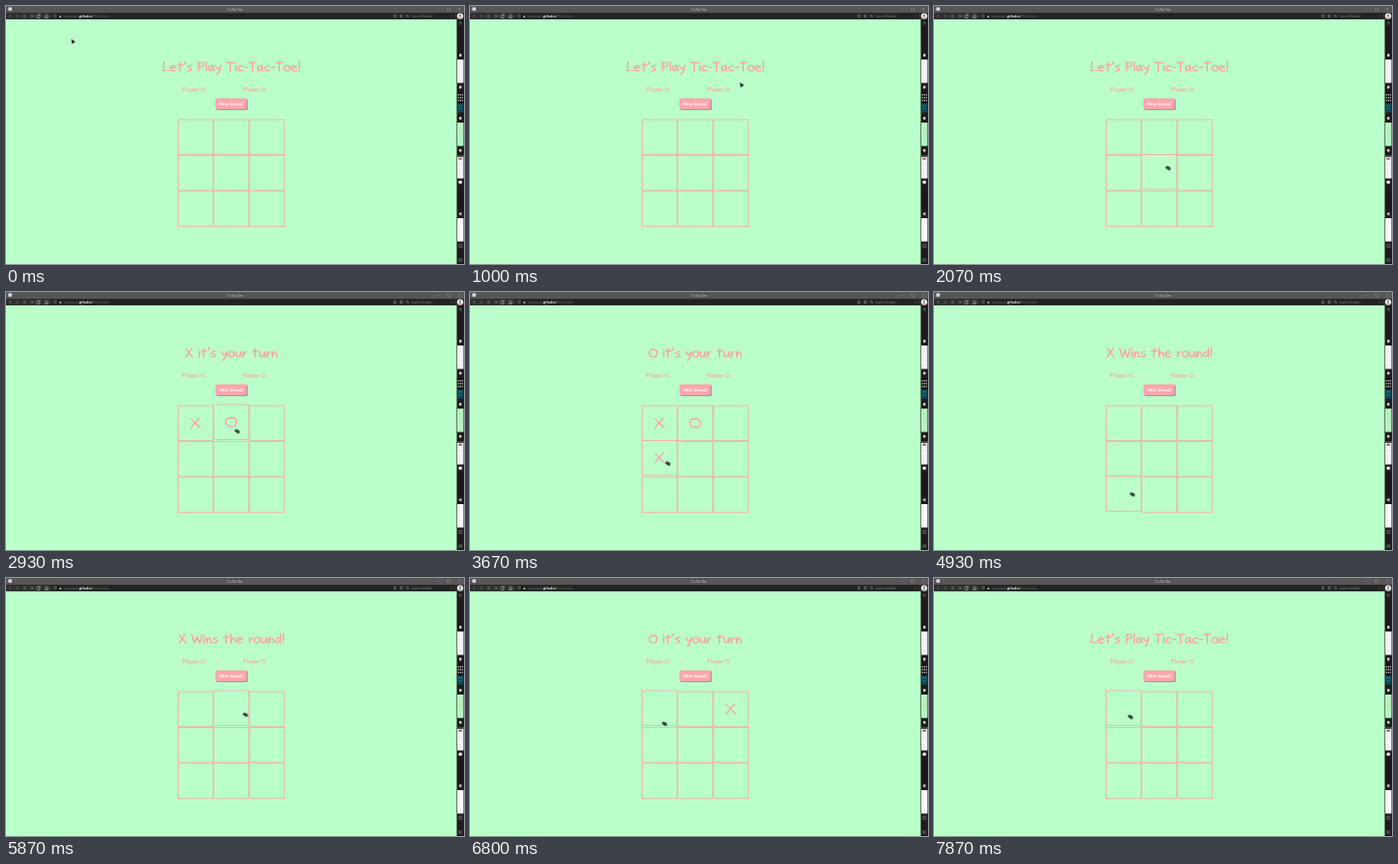
Recreate the animation shown at these times as an HTML page. Size 480 by 270 pixels, loop 8 s.

```html
<!DOCTYPE html>
<html lang="en">
<head>
<meta charset="utf-8">
<title>Tic Tac Toe</title>
<style>
html, body { margin: 0; width: 100%; height: 100%; overflow: hidden; background: #baffc9; }
svg { display: block; width: 100%; height: 100%; }
text { font-family: "Open Sans", "Noto Sans", sans-serif; }
.ink { fill: none; stroke: #fca1a3; stroke-linecap: round; stroke-linejoin: round; }
.icon { fill: none; stroke: #8e8e8e; stroke-width: .6; }
.bright { stroke: #d0d0d0; }
</style>
</head>
<body>
<svg id="stage" viewBox="0 0 480 270">
  <rect width="480" height="270" fill="#baffc9"/>
  <g id="page"></g>
  <g id="chrome"></g>
  <g id="cursor">
    <path id="arrow" d="M0 0L.7 6L2.1 4.7L4.8 3.3Z" fill="#222" stroke="#e8fff0" stroke-width=".3"/>
    <path id="hand" d="M.2 1.2L1.2.5L4 1.2L5.1 2.6L4.8 4.6L2.6 4.6L1.2 3.2L0 2.8Z" fill="#3b4a41" stroke="#4b5a50" stroke-width=".4"/>
  </g>
</svg>
<script>
const LOOP = 8000, TICK = 1000 / 15;
const $ = id => document.getElementById(id);

// Hand lettering: advance and pen strokes, baseline at 0.
const PEN = {
  " ": [5, ""],
  "L": [7.5, "M1.5-11Q1-5 1-.3Q4-.2 6.5-.7"],
  "P": [8, "M1.6-10.5Q1.2-5 1.3 0M.4-10Q7-12 7-8.3Q6.5-5.3 1.4-4.6"],
  "T": [8.5, "M.3-10.2L8-10.8M4.2-10.5Q3.8-5 4 0"],
  "X": [8.5, "M1-10.3Q4-4.5 7.8 0M7-10.5Q4-5 .5 0"],
  "O": [9.2, "M4.6-9.6Q.4-9.2.5-4.8Q.9-.2 4.6-.1Q8.4-.4 8.6-4.9Q8.4-9.5 4.2-9.6"],
  "W": [12, "M.5-10.5Q1.6-4 3.2-.2Q4.8-4 5.8-8Q7-3 8.4-.2Q10.4-5 11.2-10.8"],
  "N": [8.5, "M1 0L1.2-10.4Q4-5 7-.2L7.2-10.6"],
  "G": [9, "M7.6-9.2Q5-11.8 2.2-8.4Q-.4-3 2.4-.7Q6 1.2 7.6-4.2L4.4-4"],
  "a": [7.5, "M5.8-6Q4-7.4 2-5.8Q0-3 1.3-.8Q3.4.8 5.6-5Q5.6-1 7 0"],
  "c": [7, "M5.8-6Q3.5-7.4 1.6-5Q0-1.4 2.4-.3Q4.4.2 6.2-1.2"],
  "d": [7.5, "M5.8-5.6Q4-7 2-5.6Q0-3 1.3-.8Q3.4.8 5.8-4M6-11L6 0"],
  "e": [7.5, "M.8-3.5L6-4.2Q5.5-7 3.4-6.8Q.6-6 .7-3Q1.2 0 3.6 0Q5.5-.2 6.5-1.2"],
  "h": [7, "M1.2-11L1.1 0Q2-6 4-6.2Q5.8-6 5.8 0"],
  "i": [2.8, "M1.3-6.8L1.2 0M1.3-9.6v-.6"],
  "l": [3, "M1.5-11Q1.2-5 1.4 0"],
  "m": [10, "M1-6.8L1.1 0Q1.8-6.3 3.4-6.4Q4.8-6 4.8 0Q5.6-6.2 7.2-6.4Q8.8-6 8.8 0"],
  "n": [7, "M1-6.8L1.1 0Q1.8-6.3 4-6.5Q5.8-6.2 5.8 0"],
  "o": [7.5, "M3.5-6.8Q.5-6.3.6-3Q1 0 3.6-.1Q6.4-.6 6.5-3.6Q6.2-7 3.2-6.8"],
  "r": [5.5, "M1-6.8L1.2 0Q1.4-5.6 5-6.5"],
  "s": [6.5, "M5.2-6.6Q2-7 1.4-5.4Q1.2-4.2 3.5-3.6Q5.8-2.8 5-1.2Q3.6.4.8-.4"],
  "t": [7, "M3.2-10.5Q2.8-4 3-.1M.3-7L6.3-7.4"],
  "u": [7.5, "M.9-6.7Q.5-.3 3-.2Q5.3-.6 5.9-6.6Q5.6-2 6.8 0"],
  "w": [9, "M.6-6.6L2.5-.2L4.4-5.4L6.3-.2L8.3-6.8"],
  "y": [7, "M.6-6.5Q1.4-2.8 3.2-2.6Q5-3 6-6.6Q5.4 0 2 4"],
  "'": [3, "M1.5-11L1.2-8.3"],
  "-": [5, "M.6-4.4L4.2-4.6"],
  "!": [3, "M1.6-11.5L1.4-3.2M1.4-.5v.6"],
  ":": [3, "M1.4-5.5v-.5M1.4-1v-.5"],
  "1": [3, "M1.5-10L1.5 0"]
};
const SQUAT = .86; // the hand is broad and low

// Writes s from x, or centred on x.
function write(s, x, y, size, weight, centred, color = "#fca1a3") {
  let w = 0, out = "";
  for (const ch of s) {
    out += `<path d="${PEN[ch][1]}" transform="translate(${w})"/>`;
    w += PEN[ch][0];
  }
  const left = centred ? x - w * size / 2 : x;
  return `<g class="ink" role="img" aria-label="${s}" style="stroke:${color};stroke-width:${weight / size}" ` +
    `transform="translate(${left} ${y}) scale(${size} ${size * SQUAT})">${out}</g>`;
}

const rect = (x, y, w, h, fill, extra = "") =>
  `<rect x="${x}" y="${y}" width="${w}" height="${h}" fill="${fill}" ${extra}/>`;
const icon = (d, cls = "") => `<path class="icon ${cls}" d="${d}"/>`;
const label = (s, x, y, size, fill, extra = "") =>
  `<text x="${x}" y="${y}" font-size="${size}" fill="${fill}" ${extra}>${s}</text>`;

const SIDE = 37.4, LEFT = 180, TOP = 118.6;
const MARKS = {
  X: "M14 14Q18 18.5 23.4 23.4M22.6 13.6Q18 18 13.9 23.6",
  O: "M18.6 14Q13.2 14 13.2 18.8Q13.8 23.3 18.7 23.3Q24.3 23 24.4 18.6Q24 13.9 18 14"
};

function buildPage() {
  let cells = "";
  for (let i = 0; i < 9; i++)
    cells += `<g id="cell${i}"><rect x=".4" y=".4" width="36.6" height="36.6" ` +
      `fill="none" stroke="#f5aba8" stroke-width=".8"/><path id="mark${i}" class="ink" stroke-width="1.3"/></g>`;
  $("page").innerHTML = `<g id="headline"></g>` +
    write("Player X:", 185, 89.2, .44, .7) +
    write("Player O:", 248.8, 89.2, .44, .7) +
    `<g id="score">${write("1", 222.3, 89, .4, .55)}</g>` +
    rect(220.3, 97.2, 33, 11.6, "#75857a", 'rx="1.6"') +
    rect(219.8, 96.8, 32.6, 11.1, "#ffa6ad", 'rx="1.5" stroke="#e0989b" stroke-width=".3"') +
    write("New Game!", 236.1, 104, .36, .55, true, "#fff") + cells;
}

function buildChrome() {
  const thumbs = [
    [27, 10, "#1c1c1c"], [40, 6, "#1c1c1c"], [56, 24.5, "#f4f4f4"], [90, 12, "#141414"],
    [102, 9.5, "#10495a"], [122, 24.5, "#b4f4c2"], [156, 24.5, "#f4f4f4"],
    [190, 23, "#191919"], [222, 24.5, "#f8f8f8"]
  ];
  let s = rect(0, 0, 480, 7, "#565656") + rect(0, 7, 480, 7, "#303030") +
    rect(48, 7.8, 368, 5.6, "#222") + rect(417.5, 7.8, 53, 5.6, "#222") +
    rect(472.4, 14, 7.6, 256, "#1c1c1c") +
    rect(2.4, 1.2, 3.8, 3.8, "#d8d8d8", 'rx="1"') +
    label("Tic Tac Toe", 240, 4.5, 3.2, "#ddd", 'text-anchor="middle"') +
    icon("M450.5 3.7h3M462.5 2h3v2.6h-3zM473.6 2l2.7 2.7M476.3 2l-2.7 2.7") +
    icon("M5.2 9l-1.5 1.6l1.5 1.6M11.3 9l1.5 1.6l-1.5 1.6M20.8 9.2l-1.4 1.4l1.4 1.4M19 9.2v2.8M26.2 9.2l1.4 1.4l-1.4 1.4M28 9.2v2.8") +
    `<path id="reload" class="icon bright"/>` +
    icon("M40.5 10.8l2-1.8l2 1.8M41.2 10.5v1.8h2.6v-1.8", "bright") +
    icon("M50.2 9.2h2.2v1.7l-1.1 1.3l-1.1-1.3z") + rect(56, 10.1, 2, 1.9, "#999") +
    `<text x="60.6" y="11.8" font-size="3.1" fill="#747474">maplewick.<tspan fill="#eee" font-weight="700">github.io</tspan>/Tic-Tac-Toe/</text>` +
    icon("M406.4 9.2h2.3v2.5h-2.3zM413.3 9h1.7v3l-.85-.8l-.85.8z") +
    `<circle class="icon" cx="420.7" cy="10.2" r="1"/>` + icon("M421.4 11l.9 1") +
    label("Search Wobbin", 425, 11.8, 3.2, "#858585") + icon("M466.2 10.2l1 1l1-1") +
    `<circle cx="476" cy="10.6" r="3.2" fill="#ececec"/><circle cx="476" cy="9.8" r="1.1" fill="#777"/>` +
    `<path d="M473.8 12.6Q476 10.4 478.2 12.6Z" fill="#777"/>`;
  for (const [y, h, fill] of thumbs) s += rect(473, y, 6.5, h, fill);
  for (let y = 60; y < 79; y += 4) s += rect(474, y, 4, .5, "#ddd");
  for (const y of [92, 95, 98])
    for (const x of [473.6, 475.6, 477.6]) s += rect(x, y, 1.4, 1.8, "#909090");
  s += rect(474, 104, 4, .8, "#2f7f94") + rect(474.5, 107, 3, .8, "#2f7f94") +
    rect(474.4, 127.5, 3.6, .5, "#efb0ae") +
    rect(474.6, 132.5, 3, 3.4, "none", 'stroke="#efb0ae" stroke-width=".3"') +
    rect(473, 156, 6.5, 2, "#444") + rect(474.4, 158.8, 3.4, 2, "#a8555a") + rect(474, 166, 4, .5, "#ccc");
  for (const y of [51.5, 85, 117.5, 151.2])
    s += rect(474.9, y - 1.4, 2.6, 2.8, "#cfcfcf", 'rx=".8"');
  s += `<circle cx="476.2" cy="184.3" r="1.9" fill="#e6e6e6"/>` +
    rect(474.8, 216, 2.8, 2.9, "#a99cbd") +
    icon("M474.8 249.4h3v3h-3zM474.8 17h3M474.8 18.8h3M474.8 264.8h2.8v2.4h-2.8z");
  $("chrome").innerHTML = s;
}

const START = "Let's Play Tic-Tac-Toe!", X_TURN = "X it's your turn", O_TURN = "O it's your turn";

// time, headline, board, X has scored
const STATES = [
  [0, START, ""],
  [2390, O_TURN, "X"],
  [2860, X_TURN, "XO"],
  [3460, O_TURN, "XO.X"],
  [4190, X_TURN, "XOOX"],
  [4860, "X Wins the round!", "", 1],
  [6320, O_TURN, "..X", 1],
  [6990, X_TURN, "O.X", 1],
  [7520, START, ""]
];

// time, pointer tip x, y
const PATH = [
  [0, 68.3, 34.2], [65, 68.3, 34.2], [450, 165, 72], [865, 273, 82], [930, 273, 82],
  [1000, 282.8, 79.8], [1130, 301, 83.5], [1400, 301, 83.5], [1533, 334, 121], [1600, 334, 121],
  [1900, 290, 164], [2150, 222, 164], [2390, 199, 142], [2470, 200, 142],
  [2860, 239.7, 143.2], [3000, 239.7, 143.2], [3200, 256, 161], [3460, 202, 178], [3600, 202, 178],
  [3930, 240, 162], [4190, 270, 144], [4267, 268, 152], [4460, 262, 172],
  [4800, 205.3, 209.2], [5000, 205.3, 209.2], [5400, 238, 88], [5860, 248, 140],
  [6060, 268, 142], [6320, 268, 142], [6800, 201.3, 150], [7130, 202, 149], [7860, 203.3, 142.8], [8000, 203.3, 142.8]
];

function slope(i, k) {
  const a = PATH[i - 1], b = PATH[i], c = PATH[i + 1];
  if (!a || !c || (a[1] === b[1] && a[2] === b[2]) || (c[1] === b[1] && c[2] === b[2])) return 0;
  return (c[k] - a[k]) / (c[0] - a[0]);
}

function tip(t) {
  let i = 0;
  while (i < PATH.length - 2 && t >= PATH[i + 1][0]) i++;
  const a = PATH[i], b = PATH[i + 1], d = b[0] - a[0], u = (t - a[0]) / d;
  const u2 = u * u, u3 = u2 * u;
  return [1, 2].map(k =>
    a[k] * (2 * u3 - 3 * u2 + 1) + b[k] * (3 * u2 - 2 * u3) +
    d * (slope(i, k) * (u3 - 2 * u2 + u) + slope(i + 1, k) * (u3 - u2)));
}

let shown = "";

function draw(time) {
  const t = Math.floor((time % LOOP) / TICK + .06) * TICK;
  const [, text, board, scored] = STATES.filter(s => s[0] <= t).pop();
  if (text !== shown) $("headline").innerHTML = write(shown = text, 236.5, 68.1, 1, 1.45, true);
  $("score").style.display = scored ? "" : "none";

  const [x, y] = tip(t);
  const col = Math.floor((x - LEFT) / SIDE), row = Math.floor((y - TOP) / SIDE);
  const onBoard = col >= 0 && col < 3 && row >= 0 && row < 3;
  const onButton = x > 219 && x < 253 && y > 96 && y < 109;
  for (let i = 0; i < 9; i++) {
    const c = i % 3, r = (i - c) / 3, lift = onBoard && c === col && r === row ? 1.1 : 0;
    $("cell" + i).setAttribute("transform", `translate(${LEFT + c * SIDE} ${TOP + r * SIDE - lift})`);
    $("mark" + i).setAttribute("d", MARKS[board[i]] || "");
  }
  $("cursor").setAttribute("transform", `translate(${x} ${y})`);
  $("hand").style.display = onBoard || onButton ? "" : "none";
  $("arrow").style.display = onBoard || onButton ? "none" : "";
  $("reload").setAttribute("d", t > 7390 && t < 7590
    ? "M32.6 9.2l2.8 2.8M35.4 9.2l-2.8 2.8"
    : "M35.4 9.6A1.8 1.8 0 1 0 35.8 11M35.8 8.6v1.4h-1.4");
}

buildPage();
buildChrome();
const began = performance.now();
function loop() {
  draw(performance.now() - began);
  requestAnimationFrame(loop);
}
loop();
</script>
</body>
</html>
```
